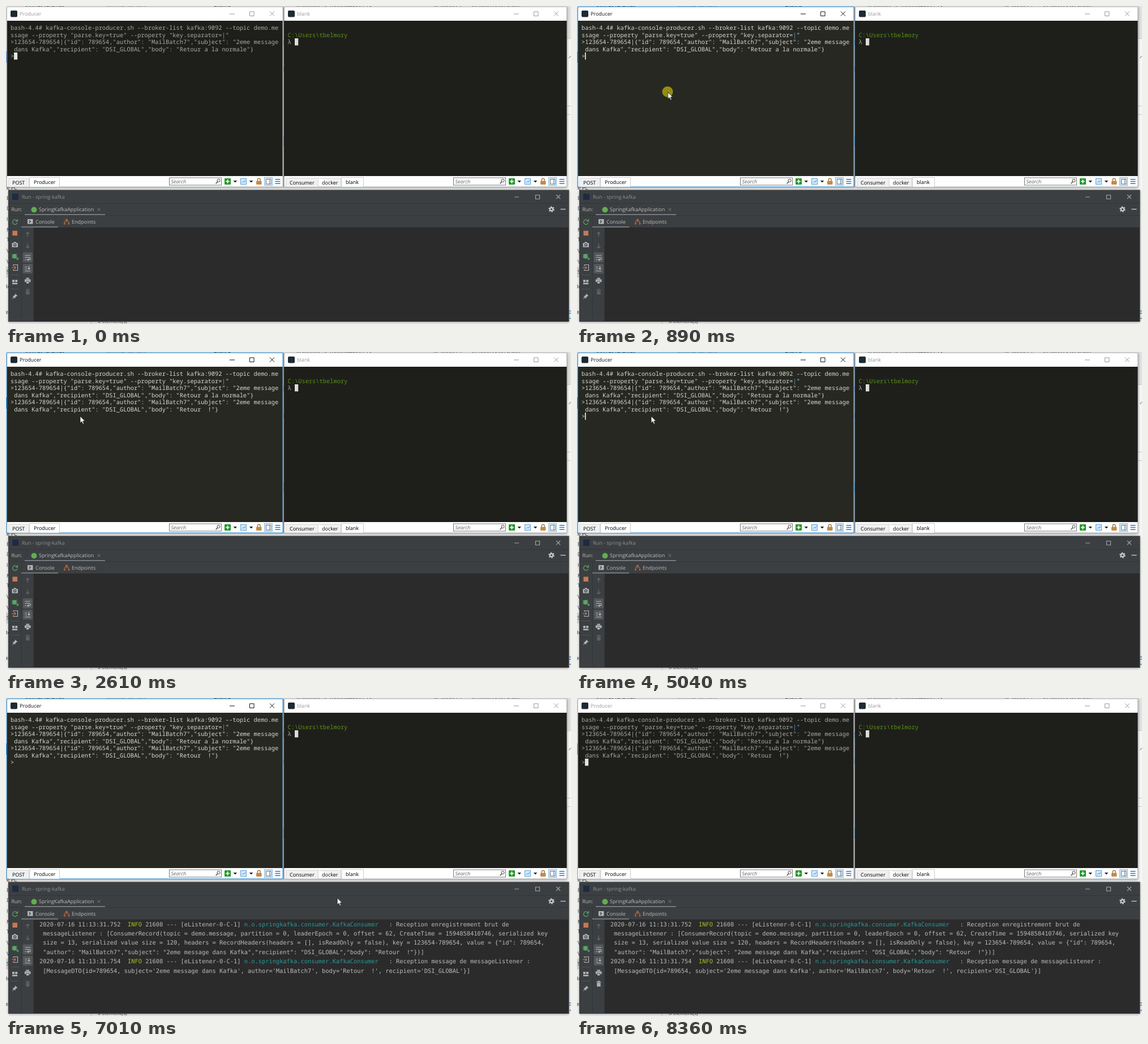
Write an HTML page that moves like this. It is 998x561 px and loops after 8460 ms.

```html
<!DOCTYPE html>
<html lang="fr">
<head>
<meta charset="utf-8">
<title>Kafka producer demo</title>
<style>
html, body { margin: 0; width: 100%; height: 100%; overflow: hidden; background: #fff; }
svg { display: block; width: 998px; height: 561px; }
text { white-space: pre; text-rendering: geometricPrecision; }
.ui { font: 9px "Open Sans", "Noto Sans", sans-serif; }
.hint { font-style: italic; fill: #666; }
.term { font: 10.397px "Noto Sans Mono", "DejaVu Sans Mono", monospace; }
.log { font: 10.361px "DejaVu Sans Mono", monospace; fill: #bbb; }
.line { fill: none; stroke-width: 1.2; }
.shade { filter: drop-shadow(0 1px 2.5px rgba(0, 0, 0, .4)); }
.win { --ink: #a9a9a5; --body: #1e1f1b; --chrome: #999; --edge: #b4b8ba; }
.body { fill: var(--body); }
.ink { fill: var(--ink); }
.chrome { fill: var(--chrome); }
.edge { fill: #fff; stroke: var(--edge); }
.btn { fill: none; stroke: var(--chrome); }
.info { fill: #a8c023; }
.class { fill: #299999; }

/* One loop lasts 8.46 s, every part shares that clock. */
#left, #bar, #block, #ring, #prompt, #log, #trash, .paste { animation: 8.46s step-end infinite; }
#left { animation-name: focus; }
#bar { animation-name: bar; }
#block { animation-name: block; }
#ring { animation-name: ring; }
#prompt { animation-name: prompt; }
#log { animation-name: log; }
#trash { animation-name: trash; }
.a { animation-name: paste-a; }
.b { animation-name: paste-b; }
.c { animation-name: paste-c; }
.d { animation-name: paste-d; }
#mouse { animation: mouse 8.46s linear infinite; }

@keyframes focus {
  0%, 98.81% { --ink: #a9a9a5; --body: #1e1f1b; --chrome: #999; --edge: #b4b8ba; }
  10.51% { --ink: #d8d8d2; --body: #272822; --chrome: #111; --edge: #2e8fd8; }
}
@keyframes bar {
  0% { visibility: hidden; transform: none; }
  10.51% { visibility: visible; }
  17.13% { visibility: hidden; }
  24.23% { visibility: visible; transform: translate(362px, 12.5px); }
  30.84%, 42.9% { visibility: hidden; }
  36.87% { visibility: visible; }
  46.8% { visibility: visible; transform: translate(0, 25px); }
  52.83%, 65.36%, 78.01%, 90.07%, 98.81% { visibility: hidden; }
  59.56%, 71.98%, 84.04%, 96.68% { visibility: visible; }
}
@keyframes block {
  0% { visibility: visible; transform: none; }
  10.51% { visibility: hidden; }
  98.81% { visibility: visible; transform: translate(0, 25px); }
}
@keyframes ring { 0%, 12.76% { visibility: hidden; } 10.51% { visibility: visible; } }
@keyframes paste-a { 0% { visibility: hidden; } 22.57%, 100% { visibility: visible; } }
@keyframes paste-b { 0% { visibility: hidden; } 23.16%, 100% { visibility: visible; } }
@keyframes paste-c { 0% { visibility: hidden; } 23.64%, 100% { visibility: visible; } }
@keyframes paste-d { 0% { visibility: hidden; } 24.23%, 100% { visibility: visible; } }
@keyframes prompt { 0% { visibility: hidden; } 46.8%, 100% { visibility: visible; } }
@keyframes log { 0% { visibility: hidden; } 61.1%, 100% { visibility: visible; } }
@keyframes trash { 0% { fill: #5c5f61; } 84.04%, 100% { fill: #afb1b3; } }
@keyframes mouse {
  0% { opacity: 0; transform: translate(865px, 545px); animation-timing-function: step-end; }
  3.9% { opacity: 1; transform: translate(865px, 545px); animation-timing-function: cubic-bezier(.3, .3, .4, 1); }
  9.8%, 13.83% { transform: translate(160.5px, 152px); }
  15.01%, 17.13% { transform: translate(133px, 118.5px); }
  17.72%, 80.3% { transform: translate(131px, 113.2px); }
  82.86% { transform: translate(584px, 352px); animation-timing-function: cubic-bezier(.25, .5, .5, 1); }
  90.6% { opacity: 1; transform: translate(950px, 562px); animation-timing-function: step-end; }
  90.66%, 100% { opacity: 0; transform: translate(950px, 562px); }
}
</style>
</head>
<body>
<svg viewBox="0 0 998 561" xml:space="preserve">
<defs>
  <g id="buttons" class="btn">
    <path d="M395 14h9M430.5 10h7.5v7.5h-7.5zM466 9.6l8 8M474 9.6l-8 8"/>
  </g>
  <g id="tools">
    <rect x="288.5" y="303" width="92" height="13" fill="#fff" stroke="#777"/>
    <text class="ui hint" x="291.5" y="312.8">Search</text>
    <circle cx="375.5" cy="308" r="2.6" fill="none" stroke="#444"/>
    <path d="M373.6 310l-3 3.4" stroke="#444" stroke-width="1.4"/>
    <rect x="386" y="304" width="11" height="11" rx="1" fill="#26962b"/>
    <path d="M391.5 306v7M388 309.5h7" stroke="#fff" stroke-width="1.7"/>
    <path d="M401.5 308h6.5l-3.2 3.5zM429.8 308h6.5l-3.2 3.5z" fill="#222"/>
    <rect x="414.5" y="304.5" width="10" height="10" fill="#d5eafb" stroke="#5b9fd6"/>
    <path d="M417 311.5l2-2 2 1 2-3" fill="none" stroke="#3b83c0"/>
    <path d="M444.3 309v-2.4a2.4 2.4 0 0 1 4.8 0V309" fill="none" stroke="#a27845" stroke-width="1.4"/>
    <rect x="442" y="308.5" width="9.5" height="6.5" rx="1" fill="#c28b45"/>
    <rect x="456.5" y="302.5" width="14" height="14" fill="#cfe7fa" stroke="#86bce4"/>
    <path d="M459.5 305.5h8.5v8.5h-8.5zM465.5 305.5v8.5" fill="#fff" stroke="#777"/>
    <path d="M475.5 305.8h9M475.5 309.5h9M475.5 313.2h9" stroke="#2876be" stroke-width="1.5"/>
  </g>
</defs>

<!-- desktop behind the windows -->
<rect width="998" height="561" fill="#f7f7f7"/>
<rect x="990" width="8" height="57" fill="#e2e2e2"/>
<g class="ui" fill="#333">
  <text x="32" y="2.5">Sources récentes</text>
  <text x="177" y="2.5" fill="#999">Modifier les liens</text>
  <text x="367" y="2.5">Avancé</text>
  <text x="513" y="1.5">instantané, les doublons</text>
  <text x="603" y="1.5">données ▾</text>
  <text x="755" y="1.5">de données</text>
  <text x="821" y="1.5">scénarios ▾ prévision</text>
  <rect y="460" width="5" height="19" fill="#d9d9d9"/>
  <text x="-3" y="324">ce PC</text>
  <text x="1" y="342">B</text><text x="1" y="360">D</text><text x="1" y="379">I</text>
  <text x="1" y="398">M</text><text x="1" y="415">T</text><text x="1" y="435">V</text>
  <text x="1" y="454">V</text><text x="1" y="472">S</text><text x="-3" y="498">Re</text>
  <text x="-1" y="543">e</text>
  <text x="162" y="559.3">6 élément(s)</text>
</g>
<path d="M150.5 557v4M990 57.5h8M990 176.5h8M990 191.5h8" stroke="#ccc"/>
<path d="M994.5 92l3-4" stroke="#666"/>
<path d="M994 538h4M994 542h4M995 551h3" stroke="#4a90cc" stroke-width="1.5"/>
<g class="shade">
  <path d="M1 1h489v318.5H1zM491 1h500v318.5H491zM4 324.5h990.5V557H4z" fill="#999"/>
</g>
<path d="M490.2 2v317" stroke="#8a8f93"/>
<path d="M.5 80v20M490.2 60v10M490.2 108v8M490.2 230v18" stroke="#3f7fb5"/>

<!-- right terminal -->
<g class="win">
  <rect class="edge" x="491.5" y="1.5" width="499" height="317.5"/>
  <rect x="498" y="8" width="12" height="11.5" rx="2" fill="#1c2b33"/>
  <text class="ui chrome" x="514" y="17">blank</text>
  <use href="#buttons" x="502"/>
  <rect class="body" x="491" y="26" width="499.5" height="274"/>
  <g class="term">
    <text x="497.5" y="54.7" fill="#5a9216">C:\Users\tbelmory</text>
    <text class="ink" x="497.5" y="67.2">λ</text>
  </g>
  <rect x="510" y="57" width="6.2" height="12.5" fill="#deded8"/>
  <path d="M494.5 319v-15.5h57v15.5M551.5 303.5h40V319" fill="#f0f0f0" stroke="#d6d6d6"/>
  <path d="M592.5 319v-16.5h39V319" fill="#fff" stroke="#ccc"/>
  <g class="ui">
    <text x="501" y="315.2">Consumer</text><text x="558" y="315.2">docker</text><text x="600" y="313.9">blank</text>
  </g>
  <use href="#tools" x="502"/>
</g>

<!-- left terminal -->
<g id="left" class="win">
  <rect class="edge" x="1.5" y="1.5" width="487.5" height="317.5"/>
  <rect x="8" y="8" width="12" height="11.5" rx="2" fill="#1c2b33"/>
  <text class="ui chrome" x="24" y="17">Producer</text>
  <use href="#buttons"/>
  <rect class="body" x="2" y="26" width="486.5" height="274"/>
  <g class="term ink">
    <text x="8" y="42.2">bash-4.4# kafka-console-producer.sh --broker-list kafka:9092 --topic demo.me</text>
    <text x="8" y="54.7">ssage --property "parse.key=true" --property "key.separator=<tspan fill="#5f9fd6">|</tspan>"</text>
    <text x="8" y="67.2">&gt;123654-789654|{"id": 789654,"author": "MailBatch7","subject": "2eme message</text>
    <text x="8" y="79.7"> dans Kafka","recipient": "DSI_GLOBAL","body": "Retour a la normale"}</text>
    <text x="8" y="92.2">&gt;<tspan class="paste a">123654-789654|{"id": 789654,"author": </tspan><tspan class="paste b">"MailBatch7","subject": "2eme message</tspan></text>
    <text x="8" y="104.7"><tspan class="paste c"> dans Kafka","recipient": </tspan><tspan class="paste d">"DSI_GLOBAL","body": "Retour  !"}</tspan></text>
    <text id="prompt" x="8" y="117.2">&gt;</text>
  </g>
  <rect id="block" x="14" y="82" width="6.2" height="12.5" fill="#e4e4de"/>
  <rect id="bar" x="14" y="82" width="1.6" height="12.5" fill="#f4f4f0"/>
  <path d="M4.5 319v-15.5h36V319" fill="#f0f0f0" stroke="#d6d6d6"/>
  <path d="M41.5 319v-16.5h53V319" fill="#fff" stroke="#ccc"/>
  <g class="ui">
    <text x="11" y="315.2">POST</text><text x="49" y="313.9">Producer</text>
  </g>
  <use href="#tools"/>
</g>

<!-- run window -->
<rect x="4" y="324.5" width="990.5" height="232.5" fill="#3c3f41"/>
<rect x="49" y="391" width="944.5" height="165" fill="#2b2b2b"/>
<path d="M5 348.5h989M5 369.5h989M27.5 370v186M48.5 391v165M27 390.5h967" stroke="#343638"/>
<rect x="11" y="331" width="11" height="11" fill="#1d2b47"/>
<g class="ui" fill="#bbb">
  <text x="28" y="340.3" fill="#8d8f90">Run - spring-kafka</text>
  <text x="9.5" y="362.2">Run:</text>
  <text x="58" y="362.2">SpringKafkaApplication</text>
  <text x="52" y="383.6">Console</text>
  <text x="116" y="383.6">Endpoints</text>
</g>
<path d="M33 368h142M27 389.8h65" stroke="#747a80" stroke-width="2"/>
<circle cx="49.5" cy="359.5" r="5" fill="#62ad53"/>
<path d="M161.5 356.5l5 5M166.5 356.5l-5 5" stroke="#777"/>
<path class="line" d="M898 337h8M935.5 333.5h7v7h-7zM972 333l7 7M979 333l-7 7" stroke="#a0a2a3"/>
<g fill="none" stroke="#c4c6c8">
  <circle cx="963.5" cy="358.5" r="4.4" stroke-width="1.8" stroke-dasharray="2.3 2.3"/>
  <circle cx="963.5" cy="358.5" r="2.7" stroke-width="2.2"/>
  <path d="M979.5 358.5h9" stroke-width="1.4"/>
</g>
<rect x="38" y="376" width="9.5" height="8.5" fill="#b4b6b8"/>
<path d="M40.5 378l3 2.3-3 2.3" fill="none" stroke="#3c3f41" stroke-width="1.3"/>
<path class="line" d="M103 385v-4l4-4 4 4v4M107 377v5" stroke="#b0653f"/>
<g fill="#b0653f">
  <circle cx="103.5" cy="384" r="1.6"/><circle cx="107" cy="377" r="1.8"/><circle cx="111" cy="384" r="1.6"/>
</g>

<!-- run toolbar -->
<path class="line" d="M19.5 379a4.2 4.2 0 1 0 .4 3.4M20.3 376v3.6h-3.6" stroke="#59a869" stroke-width="1.6"/>
<rect x="11.5" y="396.5" width="8.5" height="8.5" fill="#c67a52"/>
<path d="M10.5 418h2.7l1-1.7h3l1 1.7H21v7.5H10.5z" fill="#afb1b3"/>
<circle cx="15.7" cy="421.4" r="2" fill="#afb1b3" stroke="#3c3f41" stroke-width="1.2"/>
<ellipse cx="15" cy="441.5" rx="3.2" ry="4.2" fill="#59a869"/>
<path class="line" d="M10.5 438l9 6.5M19.5 437.5l-9 7M10 441.3h10M18 444l3.5 3M21.5 444v3h-3" stroke="#59a869"/>
<path class="line" d="M13 458.5v-2h7.5v10H13v-2" stroke="#afb1b3"/>
<path class="line" d="M10 461.5h6.5M14.5 459l2.5 2.5-2.5 2.5" stroke="#c67a52"/>
<path d="M9 474.5h14M9 499.5h14" stroke="#515456"/>
<path d="M11 483h4v4h-4zM16.2 483h4v4h-4zM11 488.3h9.2v2.8H11z" fill="#afb1b3"/>
<path d="M16.5 507.5l4 4-2 .6-2 2-.4 2.2-4.5-4.5 2.1-.4 2-2zM13 513l1.3 1.3-3.6 3.4z" fill="#afb1b3"/>

<rect x="29.5" y="434.5" width="17.5" height="18" rx="2" fill="#53575a"/>
<rect x="29.5" y="455" width="17.5" height="17" rx="2" fill="#53575a"/>
<path class="line" d="M38.3 407v-8M35.3 402l3-3 3 3M38.3 419v8M35.3 424l3 3 3-3" stroke="#66696b"/>
<path class="line" d="M33.5 440h9.5M33.5 443.5h7.5a2 2 0 0 1 0 4H38M40 445.5l-2 2 2 2M33.5 447.5h2.5M33.5 467.5h9.5M33.5 460.5h3.5M33.5 464h3.5M40.5 458.5v6M38.5 462.5l2 2 2-2" stroke="#b8babc"/>
<path d="M35.5 479.5h5.5v2.2h-5.5zM33 482.3h10.5v4.7H41v-1.7h-5.5V487H33zM36 486h4.5v3.5H36z" fill="#afb1b3"/>
<path id="trash" d="M34.5 500h2.3v-1.2h3.2v1.2h2.3v1.4h-7.8zM35.2 502.3h6.4v6.7h-6.4z"/>

<g id="log" class="log">
  <text x="59" y="402.6">2020-07-16 11:13:31.752  <tspan class="info">INFO</tspan> 21608 --- [eListener-0-C-1] <tspan class="class">n.o.springkafka.consumer.KafkaConsumer</tspan>   : Reception enregistrement brut de</text>
  <text x="59" y="419"> messageListener : [ConsumerRecord(topic = demo.message, partition = 0, leaderEpoch = 0, offset = 62, CreateTime = 1594858410746, serialized key</text>
  <text x="59" y="435.4"> size = 13, serialized value size = 120, headers = RecordHeaders(headers = [], isReadOnly = false), key = 123654-789654, value = {"id": 789654,</text>
  <text x="59" y="451.8"> "author": "MailBatch7","subject": "2eme message dans Kafka","recipient": "DSI_GLOBAL","body": "Retour  !"})]</text>
  <text x="59" y="468.2">2020-07-16 11:13:31.754  <tspan class="info">INFO</tspan> 21608 --- [eListener-0-C-1] <tspan class="class">n.o.springkafka.consumer.KafkaConsumer</tspan>   : Reception message de messageListener :</text>
  <text x="59" y="484.6"> [MessageDTO{id=789654, subject='2eme message dans Kafka', author='MailBatch7', body='Retour  !', recipient='DSI_GLOBAL'}]</text>
</g>

<circle id="ring" cx="160" cy="151.3" r="9.5" fill="#938d12"/>
<path id="mouse" d="M0 0v12l2.8-2.5 2 4.6 2-.9-2-4.4h3.9z" fill="#fff" stroke="#111" stroke-width=".8"/>
</svg>
</body>
</html>
```
